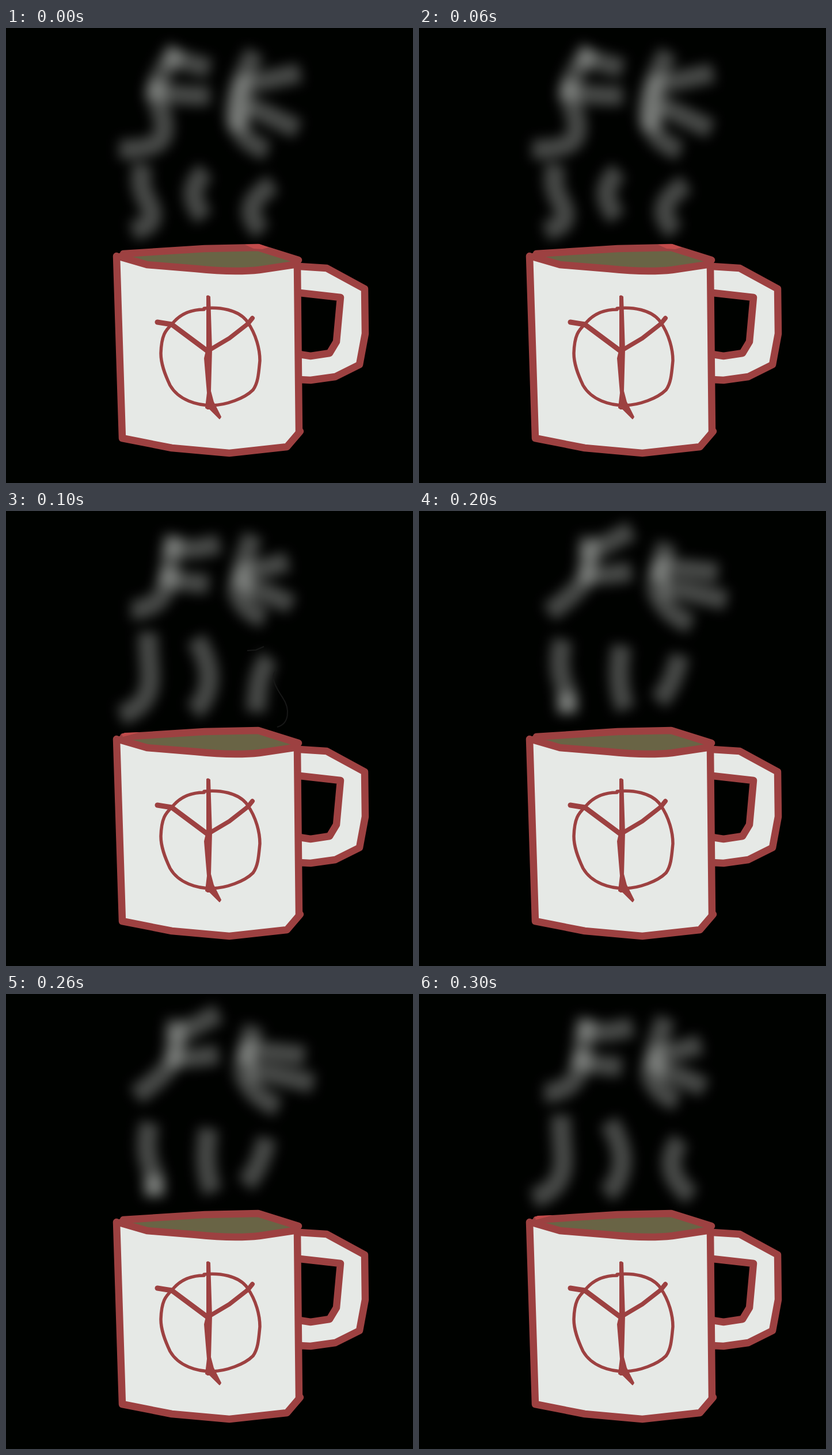
Animation, 707 px wide and 792 px high, one loop 0.4 s. Source, as an HTML page:

```html
<!DOCTYPE html>
<html lang="en">
<head>
<meta charset="utf-8">
<title>Steaming mug</title>
<style>
  html, body { margin: 0; width: 100%; height: 100%; overflow: hidden; background: #000200; }
  svg { display: block; width: 100vw; height: 100vh; }
  .lines { fill: none; stroke: #9d4141; stroke-width: 12.5; stroke-linecap: round; stroke-linejoin: round; }
  .steam { fill: none; stroke: #f4f8f4; stroke-opacity: .29; stroke-width: 34; stroke-linejoin: round; }
  .highlight { fill: #c24b4b; }
</style>
</head>
<body>
<svg viewBox="0 0 707 792">
  <defs>
    <filter id="blur" filterUnits="userSpaceOnUse" x="0" y="0" width="707" height="400" color-interpolation-filters="sRGB">
      <feGaussianBlur stdDeviation="10.5"/>
    </filter>
  </defs>

  <g id="steam" class="steam" filter="url(#blur)"></g>
  <g id="residue" fill="none" stroke="#171817" stroke-width="2">
    <path d="M471 276C457 286 468 306 480 324C495 346 491 371 471 376"/>
    <path d="M419 243L434 242L448 236"/>
  </g>

  <!-- Handle -->
  <path fill="#e6e9e6" d="M508 415L557 418L623 453L624 532L614 586L572 607L529 613L508 612V568L529 571L562 566L574 546L581 469L508 461Z"/>
  <g class="lines">
    <path d="M510 415L557 418L623 454L624 532L614 586L572 607L529 613L510 612"/>
    <path d="M510 461L581 469L574 546L562 566L529 571L510 568"/>
  </g>

  <!-- Body and rim -->
  <path fill="#e6e9e6" d="M192 397L202 714L288 731L388 740L488 729L509 702L506 412L395 424L245 412Z"/>
  <path fill="#696445" d="M206 398L345 384L438 382L508 405L440 420Q395 427 330 419L245 412Z"/>
  <g class="lines">
    <path d="M192 397L202 714L288 731L388 740L488 729L511 702"/>
    <path d="M506 412L509 702"/>
    <path d="M204 393L345 384L438 382L508 404L500 412L440 421Q395 426 330 419L245 412L197 398"/>
  </g>
  <path id="rightShine" class="highlight" d="M415 377L440 376L456 382L445 385L430 384Z"/>
  <path id="leftShine" class="highlight" d="M201 389L206 386L232 385L222 388L203 393Z"/>

  <!-- Emblem -->
  <g class="lines">
    <path style="stroke-width:5.5" d="M344 488C370 485 404 490 419 511C435 534 441 560 441 579C439 600 438 618 429 630C414 645 383 656 358 657C332 657 300 648 285 622C276 603 269 585 269 566C270 535 277 526 288 516C300 500 318 490 344 490"/>
    <path style="stroke-width:9" d="M263 512L288 516L351 563"/>
    <path style="stroke-width:7.5" d="M351 562L388 540L420 515"/>
    <path style="stroke-width:8" d="M420 515L428 505"/>
    <path style="stroke-width:2" fill="#9d4141" d="M349 467Q351 465 354 468L357 560L355 632L360 651L373 677L371 680L354 663L350 663L347 661L350 635L345 575L349 558Z"/>
  </g>
</svg>
<script>
  const poses = [
    [ // tall letters, wavy wisps
      "M298 36C268 78 255 105 262 125C272 150 280 175 270 192C260 208 230 212 197 211",
      "M278 50L354 70", "M246 104C290 118 320 118 354 118",
      "M433 42C405 90 395 130 398 155C405 190 430 205 454 214",
      "M511 78L414 99L402 178", "M420 135L507 176",
      "M238 238C228 275 240 290 252 315C258 340 245 345 220 354",
      "M347 249C318 275 320 300 344 330",
      "M464 271C420 300 415 325 445 354"
    ],
    [ // compact letters, curling wisps
      "M291 42C284 85 284 100 282 120C276 150 255 172 218 172",
      "M278 60C310 72 340 65 371 57", "M268 109C300 125 330 125 352 127",
      "M429 42C410 90 405 120 402 140C410 165 425 178 449 187",
      "M490 88L416 108L408 135", "M416 132C440 140 465 145 496 164",
      "M247 211C245 250 252 270 250 300C245 330 230 345 199 356",
      "M330 222C352 260 358 290 348 315C342 335 335 340 325 348"
    ],
    [ // leaning letters, straighter wisps
      "M296 44C292 80 295 95 288 118C275 140 255 155 226 177",
      "M286 80C320 60 340 48 370 34", "M280 110C320 113 340 110 369 105",
      "M431 56C418 95 412 120 413 140C425 170 445 185 473 197",
      "M519 107L423 97L416 122", "M422 133C460 138 490 145 534 156",
      "M250 224C240 260 245 290 255 310L258 352", "M258 316V352",
      "M352 234C345 275 345 310 359 345",
      "M453 251C445 285 435 310 416 331"
    ]
  ];
  const erasedWisp = "M458 256C438 280 437 310 434 350";
  const fullWisp = "M454 254C430 285 432 320 474 352";
  const scenes = [
    poses[0],
    [...poses[1], erasedWisp],
    poses[2],
    [...poses[1], fullWisp]
  ];

  const byId = id => document.getElementById(id);
  const show = (id, visible) => byId(id).style.display = visible ? "" : "none";
  let current = -1;

  function draw(time) {
    const step = Math.floor(time / 100) % scenes.length;
    if (step !== current) {
      current = step;
      byId("steam").innerHTML = scenes[step].map(d => `<path d="${d}"/>`).join("");
      show("residue", step === 1);
      show("rightShine", step === 0);
      show("leftShine", step % 2 === 1);
    }
    requestAnimationFrame(draw);
  }
  draw(0);
</script>
</body>
</html>
```
